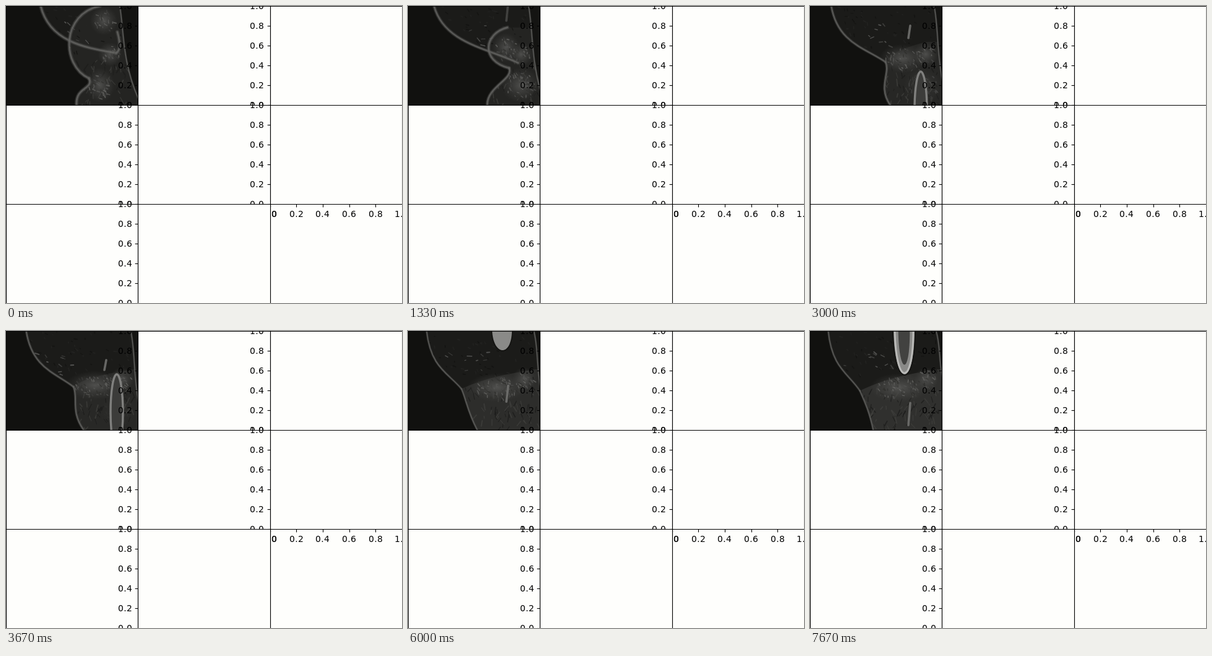
These frames come from a looping animation (640x480 px, 8000 ms). An HTML page with a canvas:

```html
<!DOCTYPE html>
<html lang="en">
<head>
<meta charset="utf-8">
<title>Slice viewer grid</title>
<style>
html, body { margin: 0; width: 100%; height: 100%; overflow: hidden; background: #fefefc; }
canvas, svg { position: absolute; left: 0; top: 0; display: block; }
text { font: 13.89px "DejaVu Sans", sans-serif; letter-spacing: .38px; fill: #000; }
</style>
</head>
<body>
<canvas id="scan" width="214" height="160"></canvas>
<svg id="axes" width="640" height="480" viewBox="0 0 640 480"></svg>
<script>
const LOOP = 8000, STEPS = 24;
const W = 640 / 3, H = 160, LABEL = 23, PAPER = '#fefefc';

// ---- plot grid: later cells cover the labels of earlier ones ----
const svg = document.getElementById('axes');
function add(tag, attrs, text) {
  const el = document.createElementNS('http://www.w3.org/2000/svg', tag);
  for (const k in attrs) el.setAttribute(k, attrs[k]);
  if (text) el.textContent = text;
  svg.appendChild(el);
}
const snap = v => Math.round(v) + 0.5;
const rule = d => add('path', { d, stroke: '#000', 'stroke-width': 1.11, fill: 'none' });
const label = (x, y, text) => add('text', { x: Math.ceil(x - 0.5), y: Math.round(y) }, text);

for (let i = 0; i < 8; i++) {
  const x = (i % 3) * W, y = Math.floor(i / 3) * H;
  const l = snap(x), r = snap(x + W), t = snap(y), b = snap(y + H);
  if (i) add('rect', { x: l, y: t, width: r - l, height: b - t, fill: PAPER });
  for (let k = 0; k <= 5; k++) {
    const text = (k / 5).toFixed(1);
    const tx = x + W * k / 5, ty = y + H * (1 - k / 5);
    rule(`M${snap(tx)} ${b}v4.86`);
    label(tx - LABEL / 2, y + H + 21, text);
    if (i % 3) {
      rule(`M${l} ${snap(ty)}h-4.86`);
      label(x - 9.72 - LABEL, ty + 5, text);
    }
  }
  rule(`M${l} ${t}H${r}V${b}H${l}Z`);
}

// ---- scan: every outline is a function of the slice number s ----
const ctx = document.getElementById('scan').getContext('2d');
const clamp = (v, lo = 0, hi = 1) => Math.max(lo, Math.min(hi, v));
const ramp = (s, from, to) => clamp((s - from) / (to - from));
const lerp = (a, b, p) => a + (b - a) * p;
const fall = (s, tau) => Math.exp(-s / tau);
const gray = (v, a = 1) => `rgba(${v},${v},${v - 2},${a})`;

// knee edge: start point and two handles
const KNEE = [
  [152, 0, 90, 12, 88, 95],
  [165, 52, 140, 60, 130, 85],
  [205, 62, 160, 70, 130, 74]
];

function shapes(s) {
  const x0 = 29 + 27 * fall(s, 5.5);
  const nx = clamp(76 + 76 * fall(s - 6, 6), 0, 178);
  const ny = Math.min(76 + 4 * s, 88 + 0.6 * (s - 9) + 12 * fall(s - 6, 2));
  const span = nx - x0;

  const early = ramp(s, 0, 6), late = ramp(s, 6, 11);
  const k = KNEE[0].map((v, i) => lerp(lerp(v, KNEE[1][i], early), KNEE[2][i], late));
  const wx = s < 6 ? lerp(134, nx, early) : nx;
  const wy = s < 6 ? lerp(117, ny, early) : ny;
  const foot = Math.min(114 + 3.5 * s, 147 - 1.95 * s);
  const bend = (wx + foot) / 2 - 21 + 1.5 * Math.abs(s - 6);

  const fx = 204 - 20 * fall(s, 5), fy = 150 - 3.3 * s;
  return {
    nx, ny, top: k[1],
    thigh: `M${x0} 0C${x0 + .12 * span} 60 ${nx - .37 * span} 68 ${nx} ${ny}`,
    knee: `M${k[0]} ${k[1]}C${k[2]} ${k[3]} ${k[4]} ${k[5]} ${wx} ${wy}`,
    leg: `C${wx + 8} ${wy + 18} ${bend} 130 ${foot} 160`,
    legStart: `M${wx} ${wy}`,
    front: `M${fx} 0C${fx + 7} ${.3 * fy} ${fx + 4} ${.6 * fy} 214 ${fy}`
  };
}

function randomFrom(seed) {
  return () => (seed = (seed * 1664525 + 1013904223) >>> 0) / 4294967296;
}

function fill(d, color) {
  ctx.fillStyle = color;
  ctx.fill(new Path2D(d));
}

function line(d, color, width) {
  ctx.strokeStyle = color;
  ctx.lineWidth = width;
  ctx.stroke(new Path2D(d));
}

function edge(d, width, alpha = 1) {
  line(d, gray(82, .45 * alpha), width);
  line(d, gray(100, .8 * alpha), width * .45);
}

// short strokes at random places; lean 0 is horizontal, 1 vertical
function flecks(rnd, count, place, tones, lean, size) {
  for (let i = 0; i < count; i++) {
    const [x, y] = place();
    const a = (lean + rnd() - .5) * Math.PI / 2, len = size * (.3 + rnd());
    line(`M${x} ${y}l${Math.cos(a) * len} ${Math.sin(a) * len}`,
      gray(tones[i % tones.length], .7), 1 + rnd());
  }
}

function patch(rnd, x, y, rx, ry, alpha) {
  if (alpha <= 0) return;
  ctx.save();
  ctx.globalAlpha = alpha;
  ctx.translate(x, y);
  ctx.scale(rx, ry);
  const g = ctx.createRadialGradient(0, 0, 0, 0, 0, 1.3);
  g.addColorStop(0, gray(92, .75));
  g.addColorStop(1, gray(70, 0));
  ctx.fillStyle = g;
  ctx.fillRect(-1.3, -1.3, 2.6, 2.6);
  ctx.restore();
  ctx.globalAlpha = alpha;
  flecks(rnd, Math.round(rx * ry / 9), () => {
    const a = rnd() * 2 * Math.PI, r = Math.sqrt(rnd());
    return [x + Math.cos(a) * r * rx, y + Math.sin(a) * r * ry];
  }, [104, 46, 88, 62], .6, 4);
  ctx.globalAlpha = 1;
}

function arch(s) {
  const alpha = ramp(s, 6, 9) * (1 - ramp(s, 15, 18));
  const ry = clamp(61 - 10.75 * (s - 11), 5, 61);
  const top = 70 + (s < 11 ? 18 * (11 - s) : 3.75 * (s - 11));
  ctx.globalAlpha = alpha;
  ctx.beginPath();
  ctx.ellipse(179, top + ry, 10, ry, 0, 0, 7);
  ctx.fillStyle = gray(60);
  ctx.fill();
  ctx.strokeStyle = gray(128);
  ctx.lineWidth = 3.4;
  ctx.stroke();
  ctx.globalAlpha = 1;
}

function femur(s) {
  const tip = 8 + 7.8 * (s - 15);
  if (tip <= 0) return;
  const w = clamp(4 + 3 * (s - 14), 4, 17);
  const u = (w, tip) => `M${152 - w} -1C${152 - w * .9} ${tip * 1.28} ${153 + w * .9} ${tip * 1.38} ${152 + w} -1Z`;
  line(u(w, tip), gray(20), 4);
  fill(u(w, tip), gray(138));
  const core = ramp(s, 20, 23);
  line(u(w - 2, tip - 2), gray(185, core), 3);
  fill(u(w * .55, tip * .78), gray(66, core));
}

function draw(s) {
  const p = shapes(s), rnd = randomFrom(s * 977 + 41);
  const lower = `${p.knee}${p.leg}L214 160V${p.top}Z`;
  const upper = `${p.thigh}L214 ${p.ny}V0Z`;
  const late = ramp(s, 4, 23);
  ctx.lineCap = ctx.lineJoin = 'round';
  ctx.fillStyle = gray(17);
  ctx.fillRect(0, 0, 214, 160);
  fill(upper, gray(27));
  fill(lower, gray(Math.round(lerp(36, 48, late))));

  const body = new Path2D(upper);
  body.addPath(new Path2D(lower));
  ctx.save();
  ctx.clip(body);
  flecks(rnd, 60, () => [30 + rnd() * 180, rnd() * 75], [18, 38], .5, 4);
  flecks(rnd, 10, () => [45 + rnd() * 90, 25 + rnd() * 45], [105, 75], .2, 6);
  flecks(rnd, 90, () => [80 + rnd() * 130, 85 + rnd() * 80], [28, 64], 1, 9);

  const spread = ramp(s, 6, 11);
  patch(rnd, 158 - 14 * spread, 92 - 68 * fall(s, 4), 17 + 20 * spread, 18, 1);
  patch(rnd, 152 + 30 * ramp(s, 0, 2), 128, 18 + 6 * ramp(s, 0, 2), 22, 1 - ramp(s, 6, 12));
  patch(rnd, 188 - 20 * fall(s, 3), 78, 15, 15, 1);
  ctx.restore();

  arch(s);
  femur(s);

  // vessel sinking through the slices
  const vy = 22 + 6.6 * (s - 6), half = 7 + Math.abs(s - 12);
  line(`M162 ${vy - half}L159 ${vy + half}`, gray(112, .9 * ramp(s, 2, 6)), 3.6);

  const thin = lerp(6, 3.4, ramp(s, 0, 15));
  edge(p.thigh, thin);
  edge(`M${p.nx} ${p.ny}q10 -6 2 -34`, thin, 1 - ramp(s, 0, 3));
  edge(p.knee, 6, 1 - ramp(s, 5, 9));
  edge(p.legStart + p.leg, thin);

  fill(`${p.front}V0Z`, gray(20));
  edge(p.front, 3);
}

let shown = -1;
const start = performance.now();
function tick(now) {
  const t = Math.max(0, now - start) % LOOP;
  const step = Math.floor((t + 4) * STEPS / LOOP) % STEPS;
  if (step !== shown) draw(shown = step);
  requestAnimationFrame(tick);
}
draw(shown = 0);
requestAnimationFrame(tick);
</script>
</body>
</html>
```
